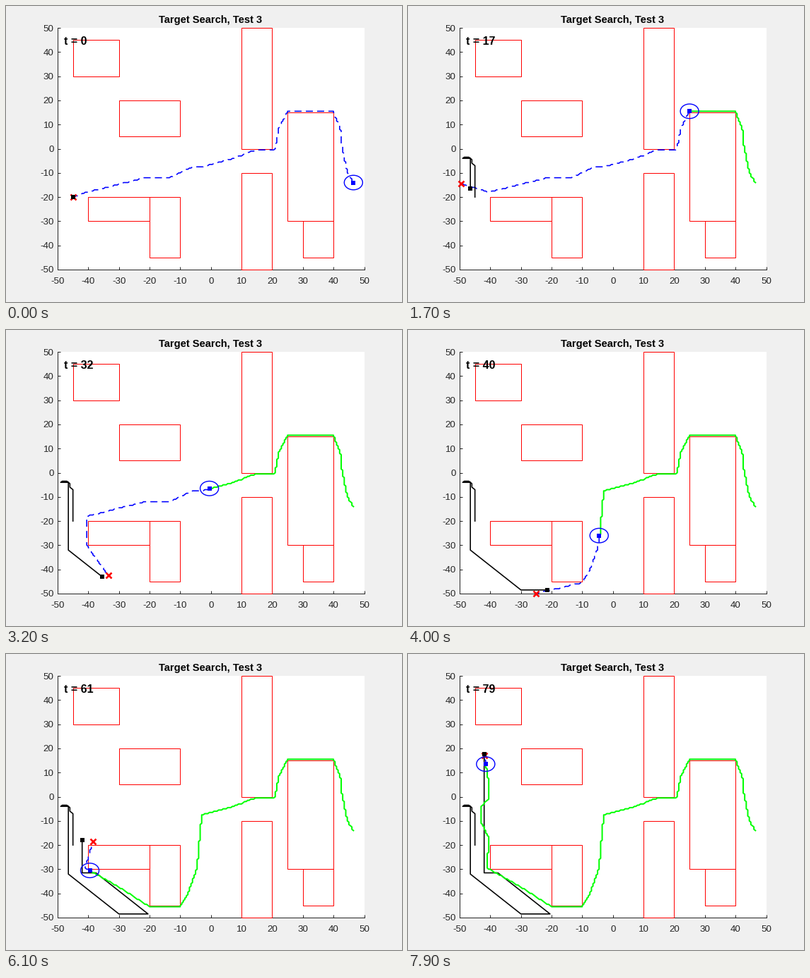
Recreate the animation shown at these times as a matplotlib script. Size 560 px wide and 420 px high, loop 8000 ms.

```python
import numpy as np
import matplotlib.pyplot as plt
from matplotlib.animation import FuncAnimation
from matplotlib.patches import Circle, Rectangle

W, H = 560, 420
PX = 0.72  # points per pixel at 100 dpi
STEPS = 80
INK = "#262626"

plt.rcParams.update({
    "font.family": "Liberation Sans",
    "axes.unicode_minus": False,
    "lines.scale_dashes": False,
})

# x, y, width, height
WALLS = [(-45, 30, 15, 15), (-30, 5, 20, 15), (10, 0, 10, 50),
         (10, -50, 10, 40), (25, -30, 15, 45), (30, -45, 10, 15),
         (-40, -30, 20, 10), (-20, -45, 10, 25)]

# Corners where the seeker changes its plan
TURN, SOUTH, SOUTH_END, BEND = (-3, -7.5), (-10, -45.5), (-20, -45.5), (-41, -29.5)

SEEKER = [(46.5, -14), (44.5, -10), (42.5, 3), (42.5, 7), (40, 15.5),
          (25, 15.5), (22, 8), (21, 0), (20.5, -0.5), (14.5, -0.5),
          (7.5, -4), TURN, (-4.5, -29.5), (-7.5, -40), SOUTH, SOUTH_END,
          (-30.5, -37), BEND, (-40.5, -17), (-43, -10.5), (-43, -4),
          (-40.5, -1), (-40.5, 6), (-41.5, 13.5)]
WEST = [(-6, -7.5), (-13.5, -12), (-21.5, -12), (-35.5, -16.5), (-40.5, -18)]
TARGET = [(-45, -20), (-45, -7), (-46, -6), (-46, -4.5), (-47, -3.5),
          (-48.5, -3.5), (-49, -4), (-46.5, -4), (-46.5, -32), (-30, -48.5),
          (-20.5, -48.5), (-37.5, -31.5), (-42, -31.5), (-42, 17.5)]


def snap(p):
    return np.round(2 * p) / 2


def stairs(points):
    """Join points by single-cell moves on a half-unit grid."""
    points = np.asarray(points, float)
    out = [points[:1]]
    for a, b in zip(points[:-1], points[1:]):
        n = int(np.ceil(2 * np.abs(b - a).max()))
        if n:
            u = np.linspace(0, 1, n + 1)[1:, None]
            out.append(snap(a + u * (b - a)))
    return np.concatenate(out)


def pace(path, straight, diagonal):
    """Path index at every step, given the cells covered per step."""
    is_diagonal = np.all(np.diff(path, axis=0) != 0, axis=1)
    clock = np.r_[0, np.cumsum(np.where(is_diagonal, 1 / diagonal, 1 / straight))]
    index = np.searchsorted(clock, np.arange(STEPS) - 1e-6)
    return np.minimum(index, len(path) - 1)


def index_of(path, p):
    return int(np.argmin(np.hypot(*(path - p).T)))


def blocked(p):
    return any(x < p[0] < x + w and y < p[1] < y + h for x, y, w, h in WALLS)


def sight(p):
    """Noisy reading of a position, kept in the arena and out of the walls."""
    while True:
        q = np.clip(snap(p + np.clip(rng.normal(0, 2, 2), -4, 4)), -50, 50)
        if not blocked(q):
            return q


rng = np.random.default_rng(4)
seeker, target = stairs(SEEKER), stairs(TARGET)
seeker_i = pace(seeker, 5.5, 3.9)
target_i = pace(target, 4, 3)
sighted = [target[0]] + [sight(target[i]) for i in target_i[1:]]
turn, south, south_end, bend = (
    index_of(seeker, p) for p in (TURN, SOUTH, SOUTH_END, BEND))


def plan(k):
    """Route from the seeker to the sighted position."""
    i, goal = seeker_i[k], sighted[k]
    stop, via = i, []
    if i <= turn:
        stop, via = turn, list(WEST)
        if goal[0] > -41 and goal[1] < -30:
            via.append((-40.5, -30))
    elif i <= south_end:
        around = goal[0] < -20 and goal[1] > -46
        stop = south_end if around else max(i, south)
    elif i <= bend and goal[1] > -30:
        stop = bend
    return stairs([*seeker[i:stop + 1], *via, goal])


fig = plt.figure(figsize=(W / 100, H / 100), dpi=100, facecolor="#f0f0f0")
ax = fig.add_axes([73 / W, 46 / H, 433.5 / W, 343 / H])
ax.set(xlim=(-50, 50), ylim=(-50, 50),
       xticks=range(-50, 51, 10), yticks=range(-50, 51, 10))
ax.spines[["top", "right"]].set_visible(False)
for side in ("left", "bottom"):
    ax.spines[side].set(color=INK, linewidth=PX)
ax.tick_params(direction="in", length=4.3 * PX, width=PX, color=INK,
               labelcolor=INK, labelsize=13.33 * PX)
ax.tick_params(axis="x", pad=10.5 * PX)
ax.tick_params(axis="y", pad=5.5 * PX)

for x, y, w, h in WALLS:
    ax.add_patch(Rectangle((x, y), w, h, fill=False, ec="red", lw=PX,
                           clip_on=False, zorder=3))


def text(x, y, s, size, ha="left"):
    return fig.text(x / W, 1 - y / H, s, size=size * PX, ha=ha,
                    va="baseline", weight="bold")


def line(color, width, z, **kw):
    return ax.plot([], [], color=color, lw=width * PX, zorder=z,
                   clip_on=False, **kw)[0]


def marker(shape, color, size, z, edge=0):
    return ax.plot([], [], shape, color=color, ms=size * PX, mew=edge * PX,
                   zorder=z, clip_on=False)[0]


text(289.5, 24, "Target Search, Test 3", 14.67, "center")
clock = text(82, 55, "", 16)
route = line("blue", 1.6, 4, dashes=(10 * PX, 6 * PX), dash_capstyle="butt")
cross = marker("x", "red", 7.5, 5, 2.6)
target_trail = line("black", 1.6, 6)
seeker_trail = line("lime", 2, 7)
target_dot = marker("s", "black", 6, 8)
seeker_dot = marker("s", "blue", 6, 8)
ring = ax.add_patch(Circle((0, 0), 3, fill=False, ec="blue", lw=1.4 * PX,
                           zorder=8, clip_on=False))


def draw(k):
    i, j = seeker_i[k], target_i[k]
    for artist, points in ((route, plan(k)), (cross, sighted[k][None]),
                           (target_trail, target[:j + 1]),
                           (seeker_trail, seeker[:i + 1]),
                           (target_dot, target[j:j + 1]),
                           (seeker_dot, seeker[i:i + 1])):
        artist.set_data(*points.T)
    ring.center = tuple(seeker[i])
    clock.set_text(f"t = {k}")


anim = FuncAnimation(fig, draw, frames=STEPS, interval=100, repeat=True,
                     repeat_delay=0, blit=False)
plt.show()
```
